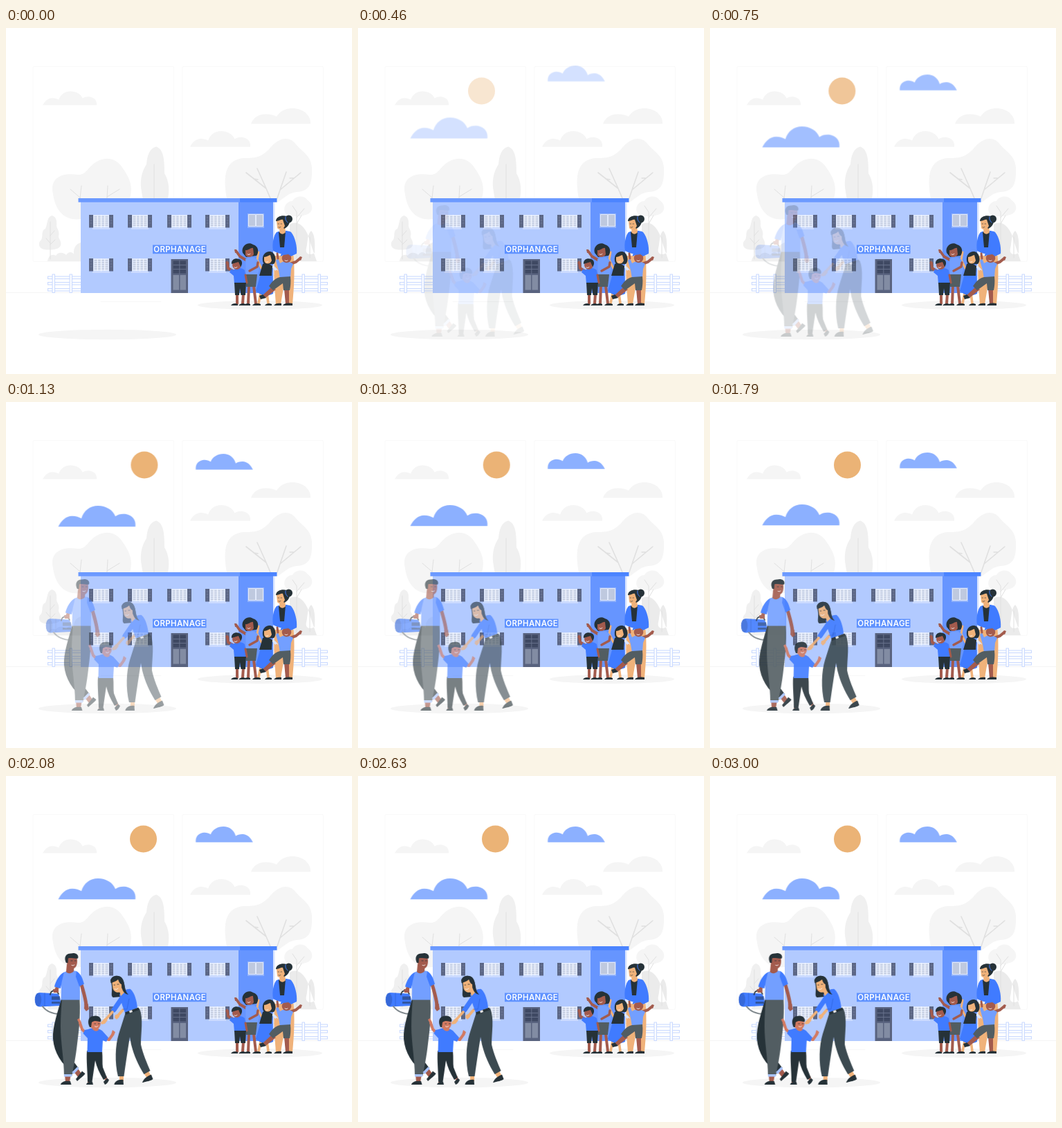
These frames come from a looping animation (500 px wide and 500 px high, 3.04 s). An HTML page:

```html
<!DOCTYPE html>
<html lang="en">
<head>
<meta charset="utf-8">
<title>Orphanage</title>
<style>
html,body{margin:0;width:100%;height:100%;overflow:hidden;background:#fff}
svg{display:block;width:100vw;height:100vh}
.ln{fill:none;stroke-linecap:round;stroke-linejoin:round}
.bl{fill:#407bff}.lb{fill:#739fff}.dk{fill:#263238}.gy{fill:#525d62}
.br{fill:#a35b4d}.tn{fill:#f0b27a}.pk{fill:#d27a62}
.sbr{stroke:#a35b4d}.stn{stroke:#f0b27a}.spk{stroke:#d27a62}.sbl{stroke:#407bff}.sdk{stroke:#263238}
.smile{stroke:#fff;stroke-width:.8}
.g1{fill:#f5f5f5}.g2{fill:#f0f0f0}.gl{stroke:#e0e0e0;stroke-width:1}
</style>
</head>
<body>
<svg viewBox="0 0 500 500">
<defs>
  <path id="cloud" d="M0 30C4 21 10 14.500 18 14.500C23 14.500 27 16 30 18C33 7 41 0 51.500 0C62 0 71 6 74 15C78 12 83 11 88 12C96 14 101 20 100 30Z"/>
  <g id="win">
    <path fill="#dfe8fb" d="M6 0h23v18.500h-23z"/>
    <path fill="#cbdaff" d="M5 18.500h25v2.500h-25z"/>
    <path class="ln" stroke="#b3bacb" stroke-width="1" stroke-linecap="butt" d="M8 3h8.500m2 0h8.500M8 6h8.500m2 0h8.500M8 9h8.500m2 0h8.500M8 12h8.500m2 0h8.500M8 15h8.500m2 0h8.500"/>
    <path stroke="#f4f7ff" stroke-width="1.200" d="M12.300 1v17M17.500 0v18.500M22.700 1v17"/>
    <path fill="#5c6786" d="M0 0h6v18.500h-6zM29 0h6v18.500h-6z"/>
    <path stroke="#7e89a6" stroke-width=".6" d="M1.500 4h3M1.500 8h3M1.500 12h3M30.500 4h3M30.500 8h3M30.500 12h3"/>
  </g>
</defs>

<!-- backdrop -->
<g fill="#fff" stroke="#f9f9f9"><rect x="39" y="55.500" width="203.500" height="282" rx="2"/><rect x="255" y="55.500" width="203.500" height="282" rx="2"/></g>
<g class="g1">
  <use href="#cloud" transform="translate(53 91.500) scale(.78 .67)"/>
  <use href="#cloud" transform="translate(266 149) scale(.87 .76)"/>
  <path d="M354 138.500C357 130 365 124 376 124.500C382 124.500 387 126 391 128C396 120 404 116 414 116C429 116 441 126 440 138.500Z"/>
  <path d="M68 240C63 218 78 208 104 212C115 213 119 201 128 195C144 184 160 188 169 203C179 217 184 230 179 246L108 276C88 279 72 268 68 240Z"/>
  <path d="M319 246C313 213 317 190 344 188C362 188 370 186 381 174C395 157 410 156 419 168C428 179 441 184 442 202C443 226 438 236 420 237C408 238 402 246 392 252Z"/>
</g>
<path class="g2" d="M217 171.500C207 174 204 185 203 197C197 206 194 217 195 230L198 250H233C237 236 236 222 229 210C229 191 228 175 217 171.500Z"/>
<path class="ln gl" d="M93 233L108 246M109 228L107 246M147 228L146 246M164 233L146 244M214 197V246"/>
<path class="ln gl" style="stroke-width:1.600" d="M347 209L376 232L382 246M363 203L376 232M405 208L396 234L392 246M426 209L396 234M358 218L364 219M416 217L410 217"/>
<g class="g2">
  <path d="M66 271C59 273 60 284 57 290C50 293 54 301 51 306C45 311 48 319 55 320C62 321 74 321 78 316C82 310 76 305 76 301C78 294 74 291 73 286C74 278 72 272 66 271Z"/>
  <path d="M60 337C61 329 67 326 72 329C76 322 84 325 87 328C90 323 96 323 98 327C97 317 102 311 109 310V337Z"/>
  <path class="g1" d="M406 270C398 263 404 250 414 250C418 242 431 241 436 249C444 254 445 265 436 269C428 272 418 274 406 270Z"/>
  <path fill="#ebebeb" d="M410 337V284C423 275 436 292 439 308L449 337ZM441 293C435 298 436 312 434 318C432 327 439 329 446 325C447 310 446 298 441 293Z"/>
</g>
<path class="ln gl" d="M64 280V334M64 300L70 293M64 311L58 304M64 313L71 306M420 337V266L414 257M420 274L431 261M420 283L427 271M439 302V332"/>

<path class="ln" stroke="#f2f2f2" stroke-width=".8" d="M0 382.500H500"/>
<path class="ln" stroke="#f8f8f8" d="M137 395.500H224"/>
<g fill="#f5f5f5"><ellipse cx="146.500" cy="443" rx="99.500" ry="7.200"/><ellipse cx="367" cy="400.500" rx="90" ry="6.500"/></g>
<g id="fence" fill="#fafcff" stroke="#c4d5ff" stroke-width=".9"></g>

<!-- building -->
<path fill="#b2caff" d="M108 250H337V383H108Z"/>
<path fill="#6695ff" d="M336 250H386V383H336Z"/>
<path fill="#d9e4ff" d="M386 252h2.500v131h-2.500z"/>
<path fill="#6c9aff" d="M104.500 246H339V251.700H104.500Z"/>
<path fill="#4b84ff" d="M338 246H391.500V251.700H338Z"/>
<g id="windows"></g>
<path fill="#91b2fb" d="M349 268h24v21h-24z"/>
<path fill="#bfc9df" stroke="#e1e9fb" d="M350.500 269.500h10v17h-10zM361.500 269.500h10v17h-10z"/>
<path fill="#59637f" d="M238.500 334H263V383H238.500Z"/>
<path fill="#3f4963" d="M241.500 336.500h18.500v18h-18.500z"/>
<path fill="#828ca3" d="M241.500 357h8.500v21.500h-8.500zM251.500 357h8.500v21.500h-8.500z"/>
<path class="ln" stroke="#6b7590" stroke-width=".9" d="M242 342.500h18M242 348.500h18M250.800 336v19"/>
<path fill="#5f92ff" d="M212 313.500h77.500v12.700H212z"/>
<text x="251.200" y="324" text-anchor="middle" fill="#fff" font-family="Inter,'Open Sans',sans-serif" font-weight="600" font-size="11.400" letter-spacing=".4">ORPHANAGE</text>

<!-- carer -->
<g>
  <path class="tn" d="M389 324H415C418 350 416 378 414 399H407L404 358L397 399H390C388 372 386 350 389 324Z"/>
  <path fill="#f1f5ff" d="M389 323H416V329H389Z"/>
  <path class="bl" d="M391 295C396 293 407 292 412 295C418 302 421 317 420 326L412 330L392 325L386 322C384 312 387 299 391 295Z"/>
  <path class="dk" d="M394 295L404 294L402 317H396Z"/>
  <path class="tn" d="M396 286L403 286L404 295C401 299 397 298 395 295Z"/>
  <path class="dk" d="M390 279C390 271 404 269 409 274C412 279 409 287 402 290L394 280Z"/>
  <circle cx="408.500" cy="276" r="5.500" class="dk"/>
  <path class="ln sbl" stroke-width="1" d="M404 273Q403 278 407 281"/>
  <path class="tn" d="M391 279C395 279 398 276 400 277L403 286C401 291 395 293 392 289Z"/>
  <path class="ln sdk" stroke-width=".6" d="M393 283h1.500M397 283h1.500M394 288q2 1 3-.5"/>
  <path class="dk" d="M387 401C389 398 393 397 398 398V401ZM402 401C405 398 409 397 414 398V401Z"/>
</g>

<!-- waving children -->
<g>
  <path class="ln sbr" stroke-width="4" d="M410 341L419 338L425 333"/>
  <path class="br" d="M422 334l3-4 3 1-2 5z"/>
  <path class="br" d="M402 377h7v22h-5z"/>
  <path class="lb" d="M396 340C401 336 410 337 415 341L412 348L411 361L396 362L394 350L390 336L393 333Z"/>
  <path class="ln sbr" stroke-width="3" d="M393 333L392 326"/>
  <circle cx="405.500" cy="332.500" r="6.800" class="br"/>
  <path class="bl" d="M397 330C396 322 410 320 415 328L411 329L408 327L401 328Z"/>
  <path class="ln smile" d="M403 336q2 1.500 4 0"/>
</g>
<g>
  <path class="ln stn" stroke-width="3.600" d="M368 383L365 398M377 383L379 398"/>
  <path class="bl" d="M368 355L385 355L386 384C378 388 368 387 361 380Z"/>
  <path class="ln" stroke="#dbe6ff" stroke-width="3.600" d="M386 345L391 350"/>
  <path class="ln stn" stroke-width="3" d="M369 347L363 335L365 324M391 351L389 358"/>
  <path class="dk" d="M371 341C376 339 381 341 385 344L384 358H366Z"/>
  <path class="dk" d="M371 337C369 325 380 320 386 325C391 331 390 338 387 341L373 342Z"/>
  <path class="tn" d="M373 331C377 331 380 328 382 328L384 336C382 342 374 342 373 336Z"/>
  <path class="ln smile" d="M376 338q2 1 3-.5"/>
  <path class="dk" d="M359 401C361 398 364 397 368 399V401ZM374 401C376 398 380 397 384 399V401Z"/>
</g>
<g>
  <path class="br" d="M384 374L390 378L375 390L370 387Z"/>
  <path class="gy" d="M396 360L411 359C412 367 411 374 410 379H401L400 369L386 379L380 373C386 364 391 361 396 360Z"/>
  <path class="dk" d="M366 387L371 385L376 390L368 392ZM400 401C402 398 408 396 414 399V401Z"/>
</g>
<g>
  <path class="ln sbr" stroke-width="4" d="M351 373L350 398M358 373L361 398"/>
  <path class="ln sbr" stroke-width="3.800" d="M348 336L338 330L333 323"/>
  <path class="br" d="M331 325l-1-5 3 0 3 5z"/>
  <path class="dk" d="M342 325C339 315 350 308 357 313C365 315 366 324 362 329L347 331Z"/>
  <path class="lb" d="M346 334C352 330 361 331 364 336L366 349L363 358L347 357Z"/>
  <path class="ln sbr" stroke-width="3.500" d="M364 339L363 345L352 351"/>
  <path class="gy" d="M347 356H363L361 374H347Z"/>
  <path class="br" d="M346 321C350 322 354 317 357 318L358 327C356 332 348 332 346 328Z"/>
  <path class="ln smile" d="M349 327q2 1.500 4-.5"/>
  <path class="dk" d="M343 401C346 398 350 397 353 399V401ZM356 401C358 398 362 397 366 399V401Z"/>
</g>
<g>
  <path class="ln sbr" stroke-width="4" d="M334 384V398M343 384L342 398M329 352L321 347L320 340"/>
  <path class="br" d="M317 340l2-4 3 3 0 4z"/>
  <path class="bl" d="M328 350C333 346 341 346 345 350L348 367L346 370H330L329 358L323 353L325 348Z"/>
  <path class="ln sbr" stroke-width="3" d="M346 357L348 368"/>
  <path class="dk" d="M330 368H347L346 386H339.500L338 376L337 386H331Z"/>
  <circle cx="333.500" cy="342.500" r="6.500" class="br"/>
  <path class="dk" d="M326 341C325 333 335 331 340 336C342 339 341 343 339 345L336 338Z"/>
  <path class="ln smile" d="M330 346q2 1.500 4-.5"/>
  <path class="dk" d="M325 401C327 398 331 397 335 399V401ZM336 401C339 398 342 397 346 399V401Z"/>
</g>

<circle id="sun" cx="198.500" cy="91" r="19.500" fill="#ebb376"/>
<g class="sky" fill="#8cb0ff">
  <use href="#cloud" transform="translate(75.500 148) scale(1.115 1.010)"/>
  <use href="#cloud" transform="translate(356.700 73) scale(-.825 .760)"/>
</g>

<g id="family">
  <!-- man -->
  <path class="ln sbr" stroke-width="5" d="M78 294L73 309"/>
  <path class="bl" d="M48 313L74 314.500C79 316 80 328 78 332L48 333.500C40 331 40 316 48 313Z"/>
  <ellipse cx="46.500" cy="323.300" rx="4.700" ry="9.700" fill="#3568d9"/>
  <path fill="#30559f" d="M66 318.500h12v5h-12zM66 326h12v3h-12z"/>
  <path class="ln" stroke="#3568d9" d="M56 314v18"/>
  <path class="ln" stroke="#7d868b" stroke-width="2" d="M53 333C59 341 67 344 79 344"/>
  <path class="ln sdk" stroke-width="1.600" d="M64 316C65 309 73 308 76 315"/>
  <path class="br" d="M68 308h8v5h-7z"/>
  <path class="br" d="M97 426L103 421L109 430L104 435ZM85 431H94L92 442H86Z"/>
  <path class="dk" d="M80 322H95C93 350 87 372 86 385C89 401 97 412 105 422L97 430C80 415 70 401 68 380C67 362 75 341 80 322Z"/>
  <path class="gy" d="M81 322L106.500 322C108 350 105 371 103 387C101 405 98 420 95.500 433H84C84 410 79 385 79 362C79 347 80 334 81 322Z"/>
  <path fill="#a9c4ff" d="M84 431H95.800L95 434.500H84ZM95.500 428L103.500 420L105.500 423L98 431Z"/>
  <path class="dk" d="M79 446C80 442 85 440 93 441L94.500 446ZM101 438L110 426.500L114.500 430C113 433 107 437 103 441Z"/>
  <path class="ln sbr" stroke-width="5" d="M108 297C111 309 115 320 116 331"/>
  <path class="br" d="M113.500 329L118.500 329L120 337L116 340L113 336Z"/>
  <path class="lb" d="M84 283.500C89 281 98 280.500 102 282L107 300L107 323.500H79.500L80 305L78 290Z"/>
  <path class="bl" d="M102 282C109 286 111 294 113 300.500L106 304L101 290ZM84 283.500C77 287 72 296 70 304.500L79 307L81 296Z"/>
  <path class="br" d="M88 272H99L98 282C95 286 89 286 87 283Z"/>
  <path class="br" d="M87 263C90 259 100 258 102.500 263C104 270 102 277 98 278C92 279 87 274 87 263Z"/>
  <path class="dk" d="M87 270C83 262 87 256 94 256.500C100 254.500 106 258 104 263.500C99 264.500 94 262 90 263.500L89.500 270Z"/>
  <path class="ln sdk" stroke-width=".8" d="M94 267h2M99.500 267h1.500"/>
  <path class="ln smile" d="M95 273.500q2 1.500 4-.5"/>

  <!-- woman -->
  <path class="tn" d="M164 431H170V441H164ZM199 429L206 426L210 434L204 437Z"/>
  <path fill="#3c4a51" d="M172.500 343L193 336C199 350 195 371 195 388C198 402 204 415 208.500 426L199.500 431C191 417 185 404 181 388L179 377C176 396 173 416 170.500 434H162C157 414 158 389 163 373Z"/>
  <path class="dk" d="M156.500 446C157 442 162 438 169.500 439L170 446ZM197 443C199 438 203 434 210 431.500L212.500 438C209 441 204 441 198 443Z"/>
  <path class="dk" d="M151 295C154 287 165 287 169 294C173 302 170 310 176 314L166 319L155 320C150 317 156 310 151 295Z"/>
  <path class="ln stn" stroke-width="4" d="M169 338L162 346"/>
  <path class="ln sbl" stroke-width="7" d="M169 319L156 338"/>
  <path class="ln stn" stroke-width="3.600" d="M154 341L143 353"/>
  <path class="tn" d="M143 350l4 3-4 5-5 1-1-3z"/>
  <path class="tn" d="M158 345l5-1 1 4-4 4-3-3z"/>
  <path class="bl" d="M164 316C169 310 176 307 180 308C186 313 189 325 190 335L172 342L168 331Z"/>
  <path class="ln" stroke="#2f66e0" stroke-width=".8" d="M178 322L175 337L169 337"/>
  <path class="dk" d="M172 341.500L191.500 334.500L192.500 338L173 345Z"/>
  <path fill="#e6e6e6" d="M178 339.500l4-1.500 1 3-4 1.500z"/>
  <path class="tn" d="M163 308L170 306L173 311L166 318Z"/>
  <path class="tn" d="M153.500 299C157 293 163 292 166 296C168 302 168 309 166 312C161 314 156 312 154.500 307Z"/>
  <path class="dk" d="M151.500 299C150 290 160 286 167 291C173 298 170 309 177 316C170 315 167 308 167 301C164 300 163 296 162 294C159 297 155 298 151.500 299Z"/>
  <path class="ln sdk" stroke-width=".8" d="M156 302h1.500M161 301h2"/>
  <path class="ln smile" d="M157 308q3 1.500 5-1"/>

  <!-- boy -->
  <path class="ln spk" stroke-width="4" d="M116 372L110 366L107 357M143 379L149 381L154 374"/>
  <path class="pk" d="M103 352l3-2 3 6-3 2zM152 374l2-7 4 3-2 5z"/>
  <path class="pk" d="M118 437h6v6h-6zM141 435l4-2 2 5-3 3z"/>
  <path class="dk" d="M117 397H139C140 407 139 415 140 421L146 436L141 439C135 429 131 420 129 411L124.500 442H118C118 426 116 411 117 397Z"/>
  <path class="bl" d="M119 366C125 363 134 364 139 368L148 378L145 384L140 382L139 399H117.500L118 379L111.500 372L114 367Z"/>
  <path class="pk" d="M125 362h8l1 5q-4 4-9-1z"/>
  <circle cx="129" cy="358.500" r="7.800" class="pk"/>
  <path class="dk" d="M121 363C117 355 119 347 127 347C133 345 139 350 137 355C132 355 129 352 124 356L123 363Z"/>
  <path class="ln sdk" stroke-width=".8" d="M128 358h1.500M133.500 358h1.500"/>
  <path class="ln smile" d="M128.500 362q2.500 1.500 4-.3"/>
  <path class="dk" d="M116 446C117 442 121 441 125 442L126 446ZM141 442L146 436.500L149 439C148 442 146 445 143 446Z"/>
</g>
</svg>
<script>
const $ = s => document.querySelector(s);

const rails = (x, w, posts) =>
  [359, 367.5, 376.5].map(y => `<rect x="${x}" y="${y}" width="${w}" height="3.5"/>`).join('') +
  posts.map(p => `<rect x="${p}" y="356" width="3.5" height="26.5"/>`).join('');
$('#fence').innerHTML = rails(60.5, 48, [67, 92]) + rails(388, 76.5, [428, 451]);

$('#windows').innerHTML = [[270, [120, 176, 233, 288]], [333, [120, 176, 288]]]
  .flatMap(([y, xs]) => xs.map(x => `<use href="#win" x="${x}" y="${y}"/>`)).join('');

// Elements slide 30 px into place while fading in, with a slight overshoot
const LOOP = 3040, HOLD = 250, STEP = 1000 / 24;
const slides = [['#sun', -30, 0, 1500], ['.sky', 0, -30, 1400], ['#family', 30, 0, 3040]]
  .map(([sel, x, y, duration]) => {
    const a = $(sel).animate(
      [{opacity: 0, transform: `translate(${x}px,${y}px)`}, {opacity: 1, transform: 'translate(0px,0px)'}],
      {duration, fill: 'both', easing: 'cubic-bezier(.36,-.01,.5,1.38)'});
    a.pause();
    return a;
  });

function draw() {
  const t = performance.now() % LOOP;
  const pose = t < HOLD ? 0 : HOLD + Math.floor((t - HOLD + 4) / STEP) * STEP;
  for (const a of slides) a.currentTime = pose;
  requestAnimationFrame(draw);
}
draw();
</script>
</body>
</html>
```
